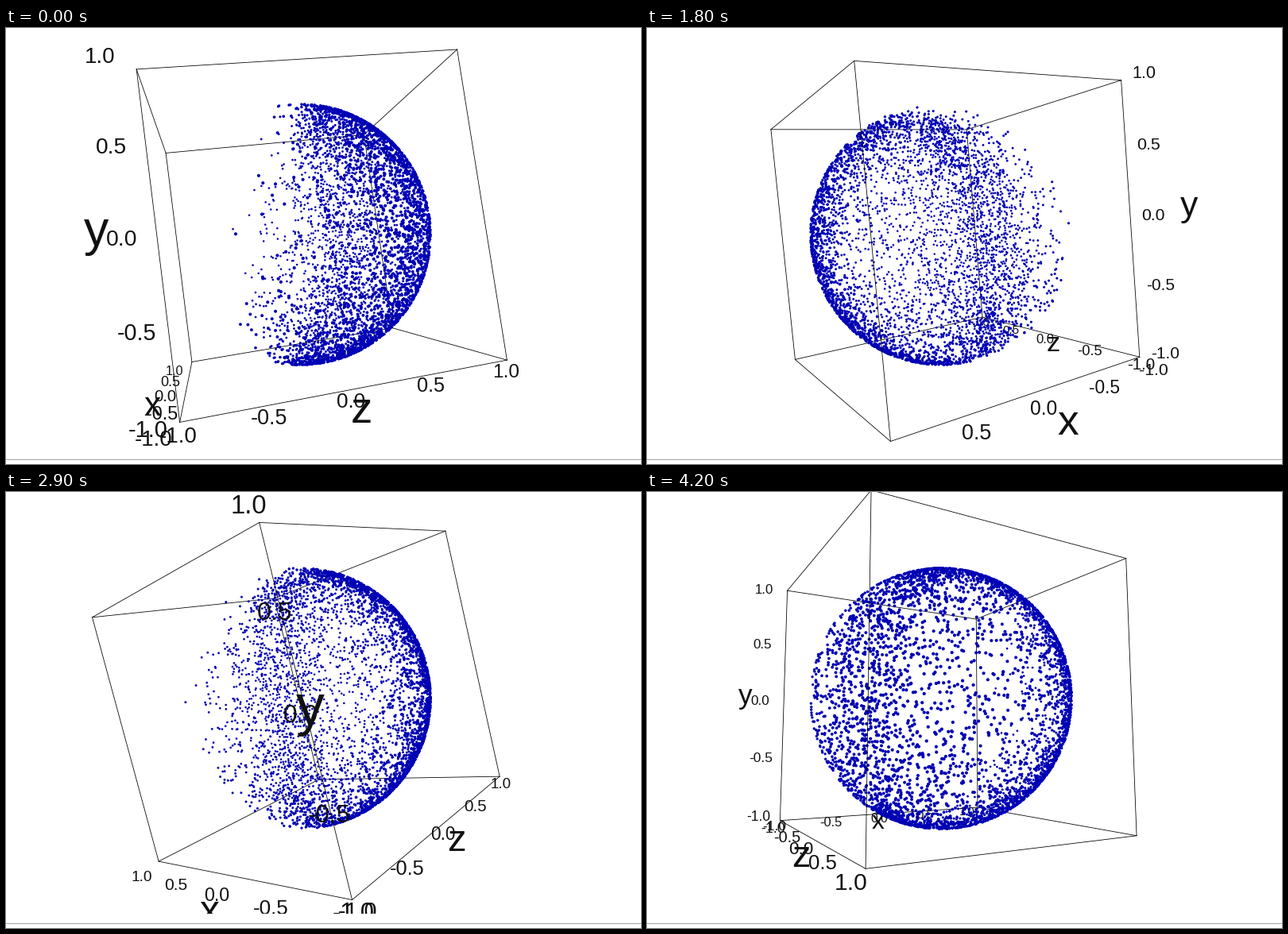
Recreate the animation shown at these times as a matplotlib script. Size 799 by 549 pixels, loop 4300 ms.

```python
from itertools import product

import numpy as np
import matplotlib.pyplot as plt
from matplotlib.animation import FuncAnimation

W, H, VIEW_H, DPI = 799, 549, 531, 64
PT = 72 / DPI
STEP, FRAMES = 100, 43
CENTER = np.array([370, 260])
FOCAL, DIST = 636, 2.0
PAUSE_AT, PAUSE = 2.0, 0.1
TICK_EM, TITLE_EM = 38, 79

# key poses of the mouse drag: seconds of dragging, then yaw, roll, pitch in degrees
POSES = np.array([
    (0.4, -10.2, -7.9, -3.3),
    (0.8, -40.7, -9.1, -1.8),
    (1.8, -120.2, -5.0, 3.2),
    (2.0, -140.0, -5.0, 3.7),
    (2.4, -99.7, -7.4, 6.0),
    (2.8, -45.2, -13.8, 3.9),
    (3.5, 13.9, -8.9, -10.3),
    (4.1, 60.7, 0.0, -5.8),
])


def sphere_points(n=4600, tilt=np.radians(12)):
    """Points on a sphere, gathered along two meridians, with an empty side."""
    rng = np.random.default_rng(7)
    side = np.where(rng.random(n) < 0.45, 57, -57)
    lon = np.where(rng.random(n) < 0.5, rng.normal(side, 14), rng.normal(-8, 62, n))
    inside = (lon > -120) & (lon < 112)
    lon = np.radians(np.where(inside, lon, rng.uniform(-118, 105, n)))
    u = rng.uniform(-1, 1, n)
    y = u * (1.2 - 0.2 * u * u)
    r = np.sqrt(1 - y * y)
    x, z = r * np.sin(lon), r * np.cos(lon)
    c, s = np.cos(tilt), np.sin(tilt)
    p = np.column_stack([x, y * c - z * s, y * s + z * c])
    p += rng.normal(0, 0.09, p.shape)
    return 0.5 * p / np.linalg.norm(p, axis=1, keepdims=True)


def rotation(t):
    t -= np.clip(t - PAUSE_AT, 0, PAUSE)
    yaw, roll, pitch = np.radians([np.interp(t, POSES[:, 0], c) for c in POSES.T[1:]])
    right, near = np.sin(roll), np.sin(pitch)
    up = np.sqrt(1 - right**2 - near**2)
    sx, sz = np.sin(yaw), -np.cos(yaw)
    x = np.array([sx, -(right * sx + near * sz) / up, sz])
    x /= np.linalg.norm(x)
    y = np.array([right, up, near])
    return np.column_stack([x, y, np.cross(x, y)])


def project(points, rot):
    """Pixel positions and distances from the camera."""
    q = points @ rot.T
    depth = DIST - q[:, 2]
    return CENTER + FOCAL * q[:, :2] * [1, -1] / depth[:, None], depth


def layer(depth):
    return 3 if depth < DIST else 1


def axis_point(axis, value, pull):
    """A point beside an axis line, pulled outwards from the box."""
    p = -0.5 - pull * np.array([1 if axis < 2 else 0.25, 0.65, 1])
    p[axis] = value / 2
    return p


def make_label(text, ha):
    return ax.text(0, 0, text, family="Liberation Sans", color="#111111",
                   ha=ha, va="baseline", clip_on=True)


dots = sphere_points()
corners = np.array(list(product((-0.5, 0.5), repeat=3)))
edges = [(i, i | bit) for i in range(8) for bit in (1, 2, 4) if not i & bit]

fig = plt.figure(figsize=(W / DPI, H / DPI), dpi=DPI, facecolor="white")
ax = fig.add_axes([0, 1 - VIEW_H / H, 1, VIEW_H / H])
ax.set(xlim=(0, W), ylim=(VIEW_H, 0))
ax.axis("off")
fig.add_artist(plt.Rectangle((0, (H - 544) / H), 1, 1 / H, lw=0, color="#a4a4a4",
                             transform=fig.transFigure))

cloud = ax.scatter(dots[:, 0], dots[:, 1], s=1, color="#0000b4", linewidths=0, zorder=2)
lines = [ax.plot([], [], color="black", lw=0.8 * PT)[0] for _ in edges]

# (artist, position, em size, shift in em)
labels = []
for axis, name in enumerate("xyz"):
    for value in np.linspace(-1, 1, 5):
        labels.append((make_label(f"{value:.1f}", "left"),
                       axis_point(axis, value, 0.067), TICK_EM, (-1.02, 0.1)))
    labels.append((make_label(name, "center"),
                   axis_point(axis, 0, 0.136), TITLE_EM, (0, 0)))
label_points = np.array([item[1] for item in labels])


def draw(frame):
    rot = rotation(frame * STEP / 1000)

    xy, depth = project(dots, rot)
    cloud.set_offsets(xy)
    cloud.set_sizes((6.3 / depth * PT) ** 2)

    xy, depth = project(corners, rot)
    for line, (a, b) in zip(lines, edges):
        line.set_data(xy[[a, b], 0], xy[[a, b], 1])
        line.set_zorder(layer((depth[a] + depth[b]) / 2))

    xy, depth = project(label_points, rot)
    for (text, _, size, shift), pos, d in zip(labels, xy, depth):
        em = size / d
        text.set_position(pos + em * np.array(shift))
        text.set_fontsize(em * PT)
        text.set_zorder(layer(d))
    return [cloud, *lines, *(item[0] for item in labels)]


anim = FuncAnimation(fig, draw, frames=FRAMES, interval=STEP, repeat=True,
                     repeat_delay=0, blit=False)
plt.show()
```
